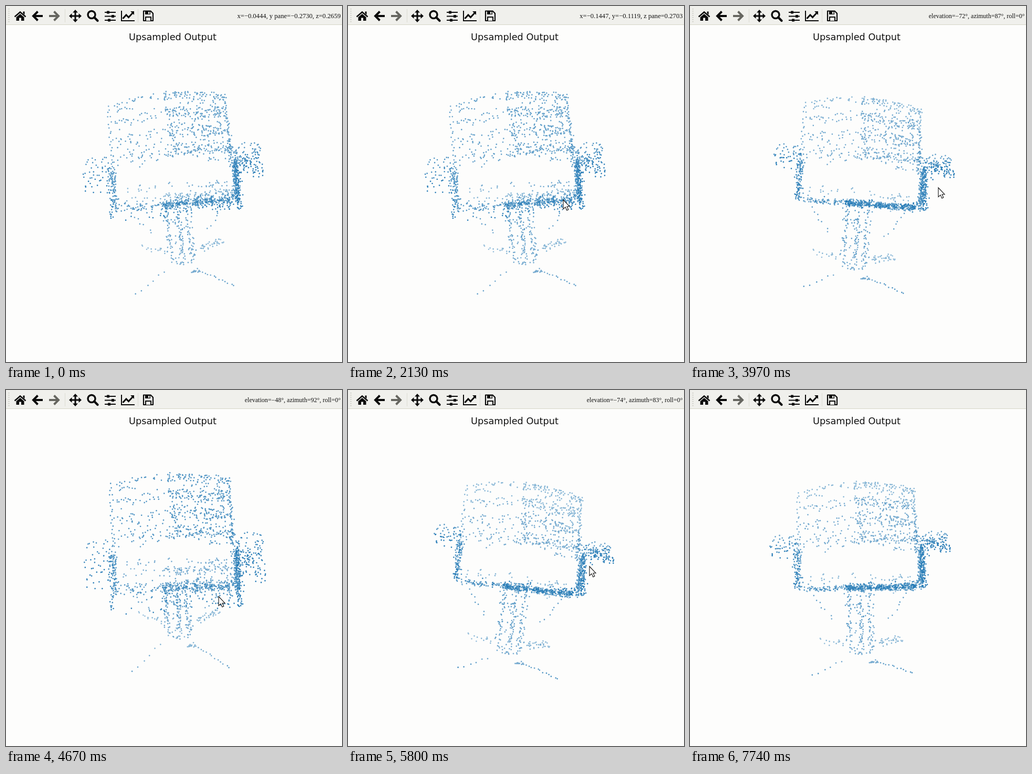
Write an HTML page that moves like this. It is 640 px wide and 676 px high and loops after 8.37 s.

```html
<!DOCTYPE html>
<html lang="en">
<head>
<meta charset="utf-8">
<title>Upsampled Output</title>
<style>
  html, body { margin: 0; width: 100%; height: 100%; overflow: hidden; background: #fdfdfc; }
  svg { display: block; width: 100%; height: 100%; }
  .title { font: 17.7px "DejaVu Sans", sans-serif; text-anchor: middle; fill: #111; }
  .status { font-family: "Liberation Serif", "Times New Roman", serif; text-anchor: end; fill: #111; }
  .line { fill: none; stroke: #0a0a0a; }
  #cloud path { fill: none; stroke: #1f77b4; stroke-width: 2.7; stroke-linecap: round; }
</style>
</head>
<body>
<svg viewBox="0 0 640 676">
  <rect width="640" height="676" fill="#fdfdfc"/>
  <rect width="640" height="36" fill="#f0f0ec"/>
  <path d="M0 35.5H640" stroke="#d6d6c6"/>
  <path d="M5.5 5V32" stroke="#c4c4bc" stroke-width="2" stroke-dasharray="1.5 2.5"/>
  <path d="M112.5 6V31M251.5 6V31" stroke="#dcdcd4"/>

  <g fill="#0a0a0a">
    <path class="line" d="M16.5 20.5L27 11.5L37.5 20.5" stroke-width="2.6"/>
    <path d="M32.5 10.5h3v6l-3-2.5zM19.5 21.3L27 15l7.5 6.3V28H29v-5.500h-4V28h-5.500z"/>
    <path class="line" d="M60.5 10.5L52 19l8.5 8.5M53 19H70" stroke-width="4"/>
    <path class="line" d="M91.5 10.5L100 19l-8.5 8.5M99 19H82" stroke-width="4" style="stroke:#666660"/>
    <path class="line" d="M132 10V28M123 19H141" stroke-width="3"/>
    <path d="M132 7l5 5.500h-10zM132 31l5-5.500h-10zM120 19l5.500-5v10zM144 19l-5.500-5v10z"/>
    <circle class="line" cx="163" cy="16.5" r="7" stroke-width="3.4"/>
    <path class="line" d="M168 21.5l6.5 6.5" stroke-width="4.2" stroke-linecap="round"/>
    <path class="line" d="M188 12H209M188 19.5H209M188 27H209" stroke-width="2"/>
    <path d="M192 9.500h5v5h-5zM201 17h5v5h-5zM194 24.500h5v5h-5z"/>
    <path class="line" d="M220 9V28H245" stroke-width="2"/>
    <path class="line" d="M222.5 24l6.5-7 4.5 4.5 8-8.5" stroke-width="3"/>
    <path d="M237 10h7v7z"/>
    <path class="line" d="M262 9.500h13.500l4.500 4.500v14h-18z" stroke-width="2.2" stroke-linejoin="round"/>
    <path d="M265 10h10v6h-10zM265 20h12v8h-12z"/>
    <path d="M271 11h2.500v4H271zM267 22h8v6h-8z" fill="#f0f0ec"/>
  </g>

  <text class="status" id="status" x="637.5" y="23"></text>
  <text class="title" x="317.5" y="65">Upsampled Output</text>
  <g id="cloud"></g>
  <path id="cursor" d="M0 0V17.5L4.100 13.900L6.800 20L9.800 18.700L7.100 12.700H12z" fill="#fdfdfc" stroke="#111" stroke-width="1.1"/>
</svg>

<script>
const LOOP = 8370, CX = 324, CY = 358, CAMERA = 2660, SHADES = 7;
const RAD = Math.PI / 180;
const $ = id => document.getElementById(id);

let seed = 20417;
function rnd() {
  seed = (seed + 0x6D2B79F5) | 0;
  let r = Math.imul(seed ^ (seed >>> 15), 1 | seed);
  r = (r + Math.imul(r ^ (r >>> 7), 61 | r)) ^ r;
  return ((r ^ (r >>> 14)) >>> 0) / 4294967296;
}
const between = (a, b) => a + (b - a) * rnd();
const around = (mid, spread) => mid + spread * (rnd() + rnd() + rnd() - 1.5) * 2;

// Chair coordinates: x right, y up, z towards the viewer.
const points = [];
function scatter(n, make) {
  for (let i = 0; i < n; i++) points.push(make());
}
function strip(n, a, b, spread) {
  for (let i = 0; i < n; i++) {
    points.push(a.map((v, j) => around(v + (b[j] - v) * i / (n - 1), spread / 2)));
  }
}

// Backrest: leans away, arched on top, denser in rows and on the right.
function backPoint() {
  const x = rnd() < .77 ? between(-8, 110) : between(-108, -8);
  const row = s => .2 + .8 * (.5 + .5 * Math.cos(2 * Math.PI * (s - .03) / .24));
  let s;
  do s = between(0, .92); while (rnd() > row(s));
  const arch = 19 * (1 - (x / 118) ** 2) * (1 - s);
  return [x, 143 - 114 * s + arch, around(-116 + 73 * s, 2)];
}

// Seat: a sloping plane, densest across its middle.
function seatPoint(z, spread) {
  const x = rnd() < .65 ? between(-28, 108) : between(-108, 108);
  return [x, around(-15 + .33 * (z - 10), spread), z];
}

scatter(590, backPoint);
scatter(300, () => seatPoint(around(6, 13), 3));
scatter(170, () => seatPoint(between(-70, 108), 4));
scatter(80, () => seatPoint(between(-82, -62), 4));
scatter(36, () => [between(-100, 108), between(-30, -10), -72]);

for (const side of [-1, 1]) {
  const dense = side > 0 ? 1 : .4;
  const many = n => Math.round(n * dense);
  // Back edge, side panel, armrest
  strip(many(55), [side * 112 - 6, 143, -116], [side * 115 - 3, 40, -50], 4);
  strip(many(165), [side * 118, 54, -18], [side * 114, -10, 25], 6);
  strip(many(95), [side * 119, 58, 0], [side * 118, 12, 95], 6);
  scatter(many(85), () => [side * between(116, 167), between(72, 84), between(-34, 108)]);
  scatter(many(34), () => [side * around(137, 10), around(77, 3), around(36, 18)]);
  strip(many(30), [side * 108, 75, -45], [side * 116, 50, 0], 12);
  // Rear leg, front leg, rim below the seat
  strip(many(34), [side * 34, -140, -30], [side * 82, -144, -60], 8);
  strip(many(14), [side * 31 - 7, -161, 12], [side * 95, -163, 84], 2);
  strip(7, [side * 88, -32, 0], [side * 56, -80, -5], 4);
}

// Pedestal and hub
scatter(95, () => [between(-31, 27), between(-150, -28), between(-10, 14)]);
for (const x of [-21, 1, 17]) strip(26, [x, -28, 10], [x, -144, 2], 4);
scatter(12, () => [around(19, 5), -163, around(17, 3)]);

const layers = Array.from({ length: SHADES }, (_, i) => {
  const path = document.createElementNS('http://www.w3.org/2000/svg', 'path');
  path.setAttribute('opacity', .45 + .48 * i / (SHADES - 1));
  return $('cloud').appendChild(path);
});

// time, mouse x, mouse y, tilt, turn, azimuth readout
const KEYS = [
  [500, 440, 700, 28.5, 5.6, 95],
  [2130, 410, 368, 28.5, 5.6, 95],
  [2970, 410, 433, 48, -1.4, 83],
  [3970, 473, 345, 18, -4.4, 87],
  [4670, 405, 392, 42, 2.9, 92],
  [5800, 460, 335, 16, -7, 83],
  [6850, 430, 338, 17, 1.3, 91],
  [7250, 660, 330, 17, 1.3, 91]
];
const GRAB = 2200, RELEASE = 6900, LEAVE = 7150;
const FIRST = [-.0444, -.2730, .2659], LAST = [-.1447, -.1119, .2703];

const ease = k => .5 - .5 * Math.cos(Math.PI * Math.min(1, Math.max(0, k)));
const mix = (a, b, k) => a.map((v, i) => v + (b[i] - v) * k);

function stateAt(t) {
  const i = Math.max(1, KEYS.findIndex(key => key[0] > t));
  const [a, b] = t >= LEAVE + 100 ? KEYS.slice(-2) : KEYS.slice(i - 1, i + 1);
  return mix(a, b, ease((t - a[0]) / (b[0] - a[0]))).slice(1);
}

function drawCloud(tilt, turn) {
  const ct = Math.cos(tilt * RAD), st = Math.sin(tilt * RAD);
  const ca = Math.cos(turn * RAD), sa = Math.sin(turn * RAD);
  const seen = points.map(([x, y, z]) => {
    const px = x * ca - y * sa, py = x * sa + y * ca;
    const depth = py * st + z * ct, f = CAMERA / (CAMERA - depth);
    return [CX + px * f, CY - (py * ct - z * st) * f, depth];
  });
  const depths = seen.map(p => p[2]);
  const near = Math.max(...depths), far = Math.min(...depths);
  const d = layers.map(() => '');
  for (const [x, y, z] of seen) {
    const k = Math.min(1, 1.2 * (z - far) / (near - far));
    d[Math.round(k * (SHADES - 1))] += `M${x.toFixed(1)} ${y.toFixed(1)}h.01`;
  }
  layers.forEach((path, i) => path.setAttribute('d', d[i]));
}

const minus = s => String(s).replace('-', '\u2212');

function drawStatus(t, tilt, azimuth) {
  const rotating = t >= GRAB && t < RELEASE;
  let text = '';
  if (rotating) {
    text = `elevation=${minus(Math.round(tilt - 90))}°, azimuth=${Math.round(azimuth)}°, roll=0°`;
  } else if (t < LEAVE) {
    const k = ease((t - 500) / 1630);
    const [x, y, z] = mix(FIRST, LAST, k).map(v => minus(v.toFixed(4)));
    text = k < .4 ? `x=${x}, y pane=${y}, z=${z}` : `x=${x}, y=${y}, z pane=${z}`;
  }
  $('status').textContent = text;
  $('status').setAttribute('font-size', rotating ? 12 : 12.6);
}

let shown = '';
function render(t) {
  const [x, y, tilt, turn, azimuth] = stateAt(t);
  const pose = tilt.toFixed(3) + ' ' + turn.toFixed(3);
  if (pose !== shown) drawCloud(tilt, turn);
  shown = pose;
  drawStatus(t, tilt, azimuth);
  $('cursor').setAttribute('transform', `translate(${x.toFixed(1)},${y.toFixed(1)})`);
}

const start = performance.now();
function tick() {
  render((performance.now() - start) % LOOP);
  requestAnimationFrame(tick);
}
tick();
</script>
</body>
</html>
```
